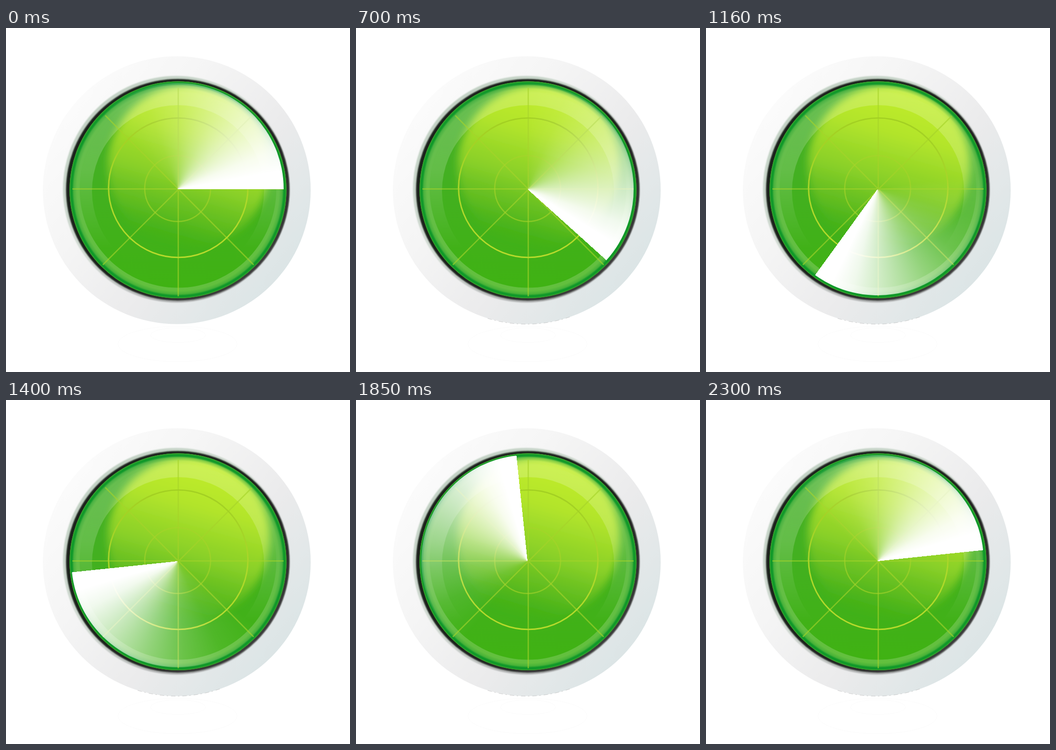
Recreate the animation shown at these times as an HTML page. Size 700 by 700 pixels, loop 2330 ms.

```html
<!DOCTYPE html>
<html lang="en">
<head>
<meta charset="utf-8">
<title>Radar</title>
<style>
  html, body { margin: 0; width: 100%; height: 100%; overflow: hidden; background: #fff; }
  svg { position: absolute; left: 0; top: 0; }
  #sweep {
    position: absolute; left: 133px; top: 112px; width: 432px; height: 432px;
    border-radius: 50%;
    background: conic-gradient(from 90deg,
      rgba(255,255,255,0) 225deg, rgba(255,255,255,.08) 250deg,
      rgba(255,255,255,.22) 272deg, rgba(255,255,255,.43) 294deg,
      rgba(255,255,255,.68) 316deg, rgba(255,255,255,.92) 338deg,
      #fff 350deg, #fff 360deg);
  }
</style>
</head>
<body>
<svg width="700" height="700" viewBox="0 0 700 700">
  <defs>
    <linearGradient id="rim" x1=".1" y1=".2" x2=".88" y2=".82">
      <stop offset="0" stop-color="#fbfbfb"/>
      <stop offset=".3" stop-color="#f5f5f5"/>
      <stop offset=".65" stop-color="#ebebec"/>
      <stop offset="1" stop-color="#dce5e6"/>
    </linearGradient>
    <linearGradient id="lip" x1=".1" y1=".2" x2=".75" y2=".95">
      <stop offset="0" stop-color="#c3d2c5"/>
      <stop offset=".45" stop-color="#d2dbd3"/>
      <stop offset=".75" stop-color="#b8baba"/>
      <stop offset="1" stop-color="#979899"/>
    </linearGradient>
    <linearGradient id="hoop" x1="0" y1="0" x2="1" y2="1">
      <stop offset="0" stop-color="#1d211d"/>
      <stop offset=".6" stop-color="#202320"/>
      <stop offset="1" stop-color="#4b4a4b"/>
    </linearGradient>
    <linearGradient id="base" x1="0" y1="0" x2="0" y2="1">
      <stop offset="0" stop-color="#45ae2c"/>
      <stop offset=".45" stop-color="#43b021"/>
      <stop offset="1" stop-color="#3fb211"/>
    </linearGradient>
    <linearGradient id="glow" gradientUnits="userSpaceOnUse" x1="425" y1="125" x2="335" y2="440">
      <stop offset="0" stop-color="#c3ee28"/>
      <stop offset=".3" stop-color="#b2e42a"/>
      <stop offset=".6" stop-color="#90d328" stop-opacity=".9"/>
      <stop offset=".82" stop-color="#74c420" stop-opacity=".55"/>
      <stop offset="1" stop-color="#4fb514" stop-opacity="0"/>
    </linearGradient>
    <linearGradient id="shine" x1="0" y1="0" x2="0" y2="1">
      <stop offset="0" stop-color="#fff" stop-opacity=".2"/>
      <stop offset=".4" stop-color="#fff" stop-opacity=".17"/>
      <stop offset=".8" stop-color="#fff" stop-opacity="0"/>
    </linearGradient>
    <linearGradient id="wire" x1="0" y1="0" x2="0" y2="1">
      <stop offset="0" stop-color="#a3d022"/>
      <stop offset=".35" stop-color="#a5d428"/>
      <stop offset=".6" stop-color="#aed82a"/>
      <stop offset="1" stop-color="#b6da2c"/>
    </linearGradient>
    <radialGradient id="edge" gradientUnits="userSpaceOnUse" cx="350" cy="329.3" r="221">
      <stop offset=".93" stop-color="#0b9428" stop-opacity="0"/>
      <stop offset=".96" stop-color="#0b9428" stop-opacity=".3"/>
      <stop offset=".975" stop-color="#0b9728" stop-opacity=".95"/>
      <stop offset="1" stop-color="#139a2a"/>
    </radialGradient>
    <filter id="soft" x="-20%" y="-20%" width="140%" height="140%">
      <feGaussianBlur stdDeviation="8"/>
    </filter>
    <filter id="fine"><feGaussianBlur stdDeviation=".8"/></filter>
    <clipPath id="face"><circle cx="350" cy="329.3" r="220.7"/></clipPath>
  </defs>

  <g fill="none" stroke="#fcfcfc">
    <ellipse cx="350" cy="625" rx="56" ry="15"/>
    <ellipse cx="349" cy="643" rx="121" ry="36"/>
  </g>
  <circle cx="347.5" cy="330" r="272.5" fill="url(#rim)"/>
  <path id="foot" d="M268 591A272.5 272.5 0 0 0 435 588" fill="none"
        stroke="#666" stroke-width=".7" stroke-dasharray="9 5 3 6" opacity=".4"/>
  <circle cx="346.5" cy="328" r="230.5" fill="url(#lip)" filter="url(#fine)"/>
  <ellipse cx="349.5" cy="329.2" rx="227.3" ry="225.5" fill="url(#hoop)" filter="url(#fine)"/>

  <g clip-path="url(#face)">
    <rect x="125" y="100" width="450" height="460" fill="url(#base)"/>
    <circle cx="372" cy="281" r="165" fill="url(#glow)" filter="url(#soft)"/>
    <path fill="#fff" fill-opacity=".18" fill-rule="evenodd"
          d="M129 329a221 221 0 1 0 442 0a221 221 0 1 0-442 0zM150 328.5a200 200 0 1 0 400 0a200 200 0 1 0-400 0z"/>
    <path fill="url(#shine)" fill-rule="evenodd"
          d="M150 328.5a200 200 0 1 0 400 0a200 200 0 1 0-400 0zM175 332a175 175 0 1 0 350 0a175 175 0 1 0-350 0z"/>
    <circle cx="350" cy="329.3" r="221" fill="url(#edge)"/>
    <circle cx="350" cy="329.3" r="219.8" fill="none" stroke="#4fa32c" stroke-width="1.6" stroke-opacity=".6"/>
  </g>

  <g fill="none" stroke="#a6d32b">
    <path stroke-width="2.6" stroke-opacity=".62"
          d="M350.5 122V546M135 327.5H565M202 178L504 482M500 179L197 482"/>
    <circle cx="349.3" cy="326.8" r="67" stroke-width="2.6" stroke-opacity=".62"/>
    <circle cx="350.5" cy="325" r="141.8" stroke="url(#wire)" stroke-width="2.8"/>
  </g>
</svg>
<div id="sweep"></div>
<script>
  const LOOP = 2330, SLOW_END = 800, SLOW = 100, FAST = 30, TURN = 6;
  const sweep = document.getElementById('sweep');
  const foot = document.getElementById('foot');

  // Slow ticks first, then fast ones; one position is skipped at the switch.
  function position(t) {
    return t < SLOW_END
      ? Math.floor(t / SLOW)
      : 9 + Math.floor((t - SLOW_END) / FAST);
  }

  function draw() {
    const t = performance.now() % LOOP;
    sweep.style.transform = `rotate(${position(t) * TURN}deg)`;
    foot.style.visibility = t < SLOW ? 'hidden' : 'visible';
    requestAnimationFrame(draw);
  }
  draw();
</script>
</body>
</html>
```
